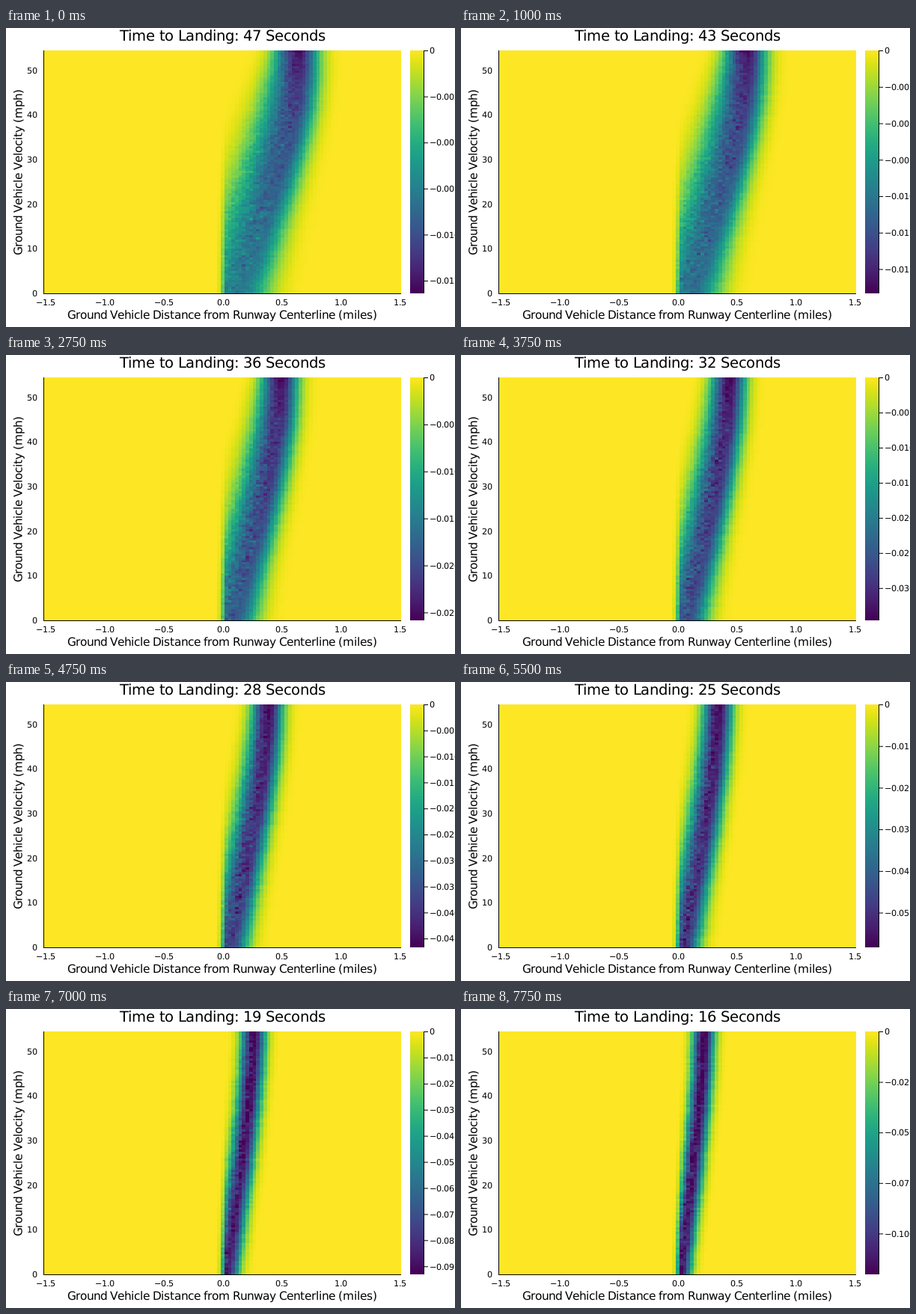
A matplotlib script for the animation above (8 s loop, 600 by 400 pixels).

```python
import numpy as np
import matplotlib.pyplot as plt
from matplotlib.animation import FuncAnimation
from matplotlib.patches import PathPatch
from matplotlib.path import Path
from matplotlib.textpath import TextPath
from matplotlib.transforms import Affine2D

W, H, DPI = 600, 400, 100
LEFT, RIGHT, TOP, BOTTOM = 51, 528, 30, 355
COLS, ROWS = 101, 109
VMAX = 54.4
START, FRAMES = 47, 32
MILE = (RIGHT - LEFT) / 3.03     # pixels per mile
MPH = 5.96                       # pixels per mph
ZERO = (LEFT + RIGHT) / 2
TITLE, GUIDE, TICK = (1.4 * pt for pt in (14, 11, 8))   # pixel sizes
FONT = {"family": "DejaVu Sans"}

fig = plt.figure(figsize=(W / DPI, H / DPI), dpi=DPI, facecolor="white")
ax = fig.add_axes([0, 0, 1, 1])

widths = {}


def advance(ch):
    """Advance width of a character in em."""
    if ch not in widths:
        ends = [TextPath((0, 0), s, size=100, prop=FONT).get_extents().x1
                for s in ("|", ch + "|")]
        widths[ch] = (ends[1] - ends[0]) / 100
    return widths[ch]


def layout(s, size, x, y, align=0.0, angle=0):
    """Outline of a text whose pen moves by whole pixels."""
    pen, glyphs = 0, []
    for ch in s:
        if ch != " ":
            glyph = TextPath((0, 0), ch, size=size, prop=FONT)
            glyphs.append(glyph.transformed(Affine2D().translate(pen, 0)))
        pen += int(advance(ch) * size + 0.01)
    place = (Affine2D().translate(-round(align * pen), 0).scale(1, -1)
             .rotate_deg(angle).translate(x, y))
    return Path.make_compound_path(*glyphs).transformed(place)


def text(*args, **kw):
    patch = PathPatch(layout(*args, **kw), fc="black", lw=0, snap=False)
    return ax.add_patch(patch)


def line(x, y):
    return ax.plot(x, y, color="black", lw=72 / DPI, snap=False,
                   solid_capstyle="butt")[0]


def image(data, left, right):
    return ax.imshow(data, cmap="viridis_r", vmin=0, vmax=1, origin="lower",
                     extent=[left, right, BOTTOM, TOP],
                     interpolation="nearest", aspect="auto")


# Distance of each column in pixels from the centerline, speed of each row
dist = (np.arange(COLS) - COLS // 2) * 0.03 * MILE
speed = np.linspace(0, VMAX, ROWS)[:, None]
gate = np.where(dist > 1, 1.0, 0.0)
gate[COLS // 2 - 1:COLS // 2 + 1] = 0.1, 0.48


def depth(t):
    """Lowest value of the map at t seconds before landing."""
    times = [16, 21, 28, 32, 36, 40, 47]
    lows = [0.1202, 0.0785, 0.0467, 0.0346, 0.02584, 0.01986, 0.01319]
    return np.exp(np.interp(t, times, np.log(lows)))


def field(t):
    """Relative depth, 0 to 1, of every cell."""
    rng = np.random.default_rng(t)
    r = speed / VMAX
    grow = t / 16
    drift = 25 * (t / START) ** 1.5
    center = MILE * speed * t / 3600 + drift * (1 - (speed / 50) ** 4)

    right_top, right_low = 9.5 * grow ** 0.57, 9 * grow
    left_top, left_low = 11.5 * grow ** 0.64, 10.5 * grow ** 1.33
    right = right_top + (right_low - right_top) * (1 - r) ** 3
    left = left_top + (left_low - left_top) * (1 - r ** 3)

    rough = 1 - 0.6 * r ** 3
    off = dist - center - rng.normal(0, 0.5, (ROWS, 1)) * rough
    shape = np.where(off < 0,
                     np.exp(-0.5 * np.abs(off / left) ** 2.3),
                     np.exp(-0.5 * (off / right) ** 2))
    amp = 1 - 0.42 * (t - 12) / 35 * np.sqrt(1 - r)
    grain = np.where(off < 0, 0.08, 0.035) * rough
    noise = 1 + rng.normal(0, 1, (ROWS, COLS)) * grain
    return np.clip(amp * shape * gate * noise, 0, 1)


def tick_step(low):
    """Step between colorbar ticks and its number of decimals."""
    power = int(np.floor(np.log10(low)))
    lead = low / 10.0 ** power
    if lead > 5:
        return 10.0 ** power, -power
    if lead > 2.5:
        return 0.5 * 10.0 ** power, 1 - power
    return 0.25 * 10.0 ** power, 2 - power


heat = image(np.zeros((ROWS, COLS)), LEFT, RIGHT)
image(np.linspace(1, 0, 256)[:, None], 540, 558)

line([50.5, 50.5], [TOP, BOTTOM + 1])
line([50, RIGHT], [BOTTOM + 0.5] * 2)
line([558.5, 558.5], [TOP, BOTTOM])

for k in range(-3, 4):
    label = f"{k / 2:.1f}".replace("-", "\u2212")
    text(label, TICK, round(ZERO + k / 2 * MILE), 371, align=0.5)
for v in range(0, 51, 10):
    text(str(v), TICK, 42, round(BOTTOM - MPH * v + 3.8), align=1)

text("Ground Vehicle Distance from Runway Centerline (miles)",
     GUIDE, 289, 389, align=0.5)
text("Ground Vehicle Velocity (mph)", GUIDE, 21.5, 193, align=0.5, angle=-90)
title = text("-", TITLE, 290, 17)
marks = [(line([558, 564], [0, 0]), text("0", TICK, 566, 0))
         for _ in range(12)]

ax.set_xlim(0, W)
ax.set_ylim(H, 0)
ax.axis("off")


def update(i):
    t = START - i
    title.set_path(layout(f"Time to Landing: {t} Seconds", TITLE,
                          290, 17, align=0.5))
    heat.set_data(field(t))
    low = depth(t)
    step, places = tick_step(low)
    for k, (mark, label) in enumerate(marks):
        shown = k * step <= low
        mark.set_visible(shown)
        label.set_visible(shown)
        y = TOP + 0.5 + (BOTTOM - TOP) * k * step / low
        mark.set_ydata([y, y])
        value = f"\u2212{k * step:.{places}f}" if k else "0"
        label.set_path(layout(value, TICK, 566, round(y + 3.8)))
    return []


anim = FuncAnimation(fig, update, frames=FRAMES, interval=250,
                     init_func=lambda: update(0), repeat=True,
                     repeat_delay=0, blit=False)
plt.show()
```
